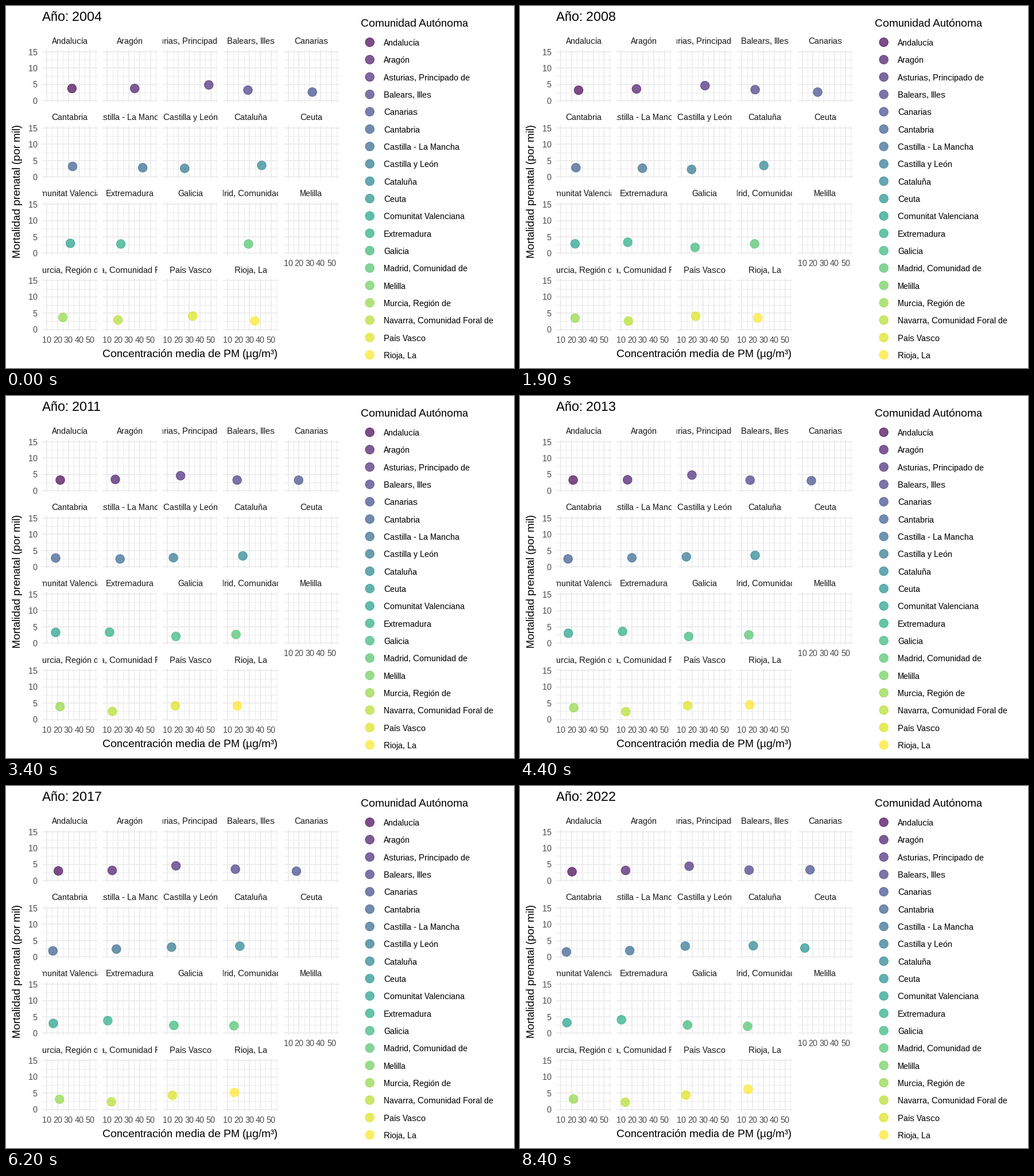
Recreate the animation shown at these times as a matplotlib script. Size 885 by 632 pixels, loop 8500 ms.

```python
import numpy as np
import matplotlib.pyplot as plt
from matplotlib.animation import FuncAnimation
from matplotlib.patches import Circle, Rectangle

W, H, DPI = 885, 632, 64
FRAMES, STEP_MS = 85, 100
FIRST, LAST = 2004, 2022

# panel geometry in pixels
LEFT, TOP, BOTTOM, WIDTH = 63, 76, 167.6, 96
PITCH_X, PITCH_Y = 105.15, 133.2
ZERO_Y, UNIT_Y = 165, 5.68
TEN_X, UNIT_X = 8, 1.885

# first and last PM level, first and last mortality
REGIONS = {
    "Andalucía": (33.3, 20.1, 3.7, 2.7),
    "Aragón": (35.5, 13.7, 3.7, 3.1),
    "Asturias, Principado de": (48.2, 16.4, 4.8, 4.4),
    "Balears, Illes": (28.6, 16.4, 3.2, 3.2),
    "Canarias": (32.3, 16.9, 2.6, 3.3),
    "Cantabria": (33.9, 14.8, 3.2, 1.5),
    "Castilla - La Mancha": (42.9, 17.4, 2.8, 1.9),
    "Castilla y León": (25.9, 13.2, 2.6, 3.3),
    "Cataluña": (41.3, 20.1, 3.5, 3.4),
    "Ceuta": (14.8, 12.4, 8.3, 2.7),
    "Comunitat Valenciana": (31.8, 15.3, 3.0, 3.2),
    "Extremadura": (22.7, 10.0, 2.8, 4.1),
    "Galicia": (27.0, 15.3, 1.8, 2.5),
    "Madrid, Comunidad de": (29.1, 15.0, 2.8, 2.1),
    "Melilla": None,
    "Murcia, Región de": (24.9, 21.7, 3.7, 3.2),
    "Navarra, Comunidad Foral de": (20.1, 13.7, 2.9, 2.2),
    "País Vasco": (33.3, 13.7, 4.1, 4.4),
    "Rioja, La": (34.9, 15.3, 2.6, 6.2),
}
LATE_START = {"Galicia": 2005, "Ceuta": 2019}
COLORS = plt.get_cmap("viridis")(np.linspace(0, 1, len(REGIONS)))

# small yearly ups and downs in mortality
YEARS = np.arange(FIRST, LAST + 1)
WOBBLE = np.random.default_rng(4).normal(0, 0.2, (len(REGIONS), len(YEARS)))
WOBBLE[:, [0, -1]] = 0

plt.rcParams.update({
    "font.family": "Liberation Sans",
    "text.hinting": "native",
    "text.hinting_factor": 1,
})
fig = plt.figure(figsize=(W / DPI, H / DPI), dpi=DPI, facecolor="white")
ax = fig.add_axes([0, 0, 1, 1])
ax.set_xlim(0, W)
ax.set_ylim(H, 0)
ax.axis("off")


def pt(px):
    return px * 72 / DPI


def label(x, y, s, size=15, color="black", ha="left", **kw):
    return ax.text(x, y, s, fontsize=pt(size), color=color, ha=ha,
                   va="baseline", **kw)


def line(xs, ys, width):
    ax.plot(xs, ys, color="#EBEBEB", lw=pt(width), solid_capstyle="butt",
            zorder=1)


def dot(x, y, color):
    shade = (*color[:3], 0.7)
    return ax.add_patch(Circle((x, y), 7.75, facecolor=shade, edgecolor=shade,
                               lw=pt(0.95), zorder=3))


def clip_rect(x, bottom, height):
    return Rectangle((x, bottom), WIDTH, -height, transform=ax.transData)


def corner(k):
    row, col = divmod(k, 5)
    return LEFT + PITCH_X * col, PITCH_Y * row


def to_px(k, pm, deaths):
    x0, dy = corner(k)
    return x0 + TEN_X + (pm - 10) * UNIT_X, ZERO_Y + dy - deaths * UNIT_Y


def draw_panel(k, name):
    x0, dy = corner(k)
    for width, xs, ys in ((1, range(15, 60, 10), (2.5, 7.5, 12.5)),
                          (1.8, range(10, 60, 10), (0, 5, 10, 15))):
        for v in ys:
            y = to_px(k, 0, v)[1]
            line([x0, x0 + WIDTH], [y, y], width)
        for v in xs:
            x = to_px(k, v, 0)[0]
            line([x, x], [TOP + dy, BOTTOM + dy], width)
    strip = label(x0 + WIDTH / 2, 66 + dy, name, color="#1A1A1A", ha="center")
    strip.set_clip_on(True)
    strip.set_clip_path(clip_rect(x0, TOP + dy, 28))
    if k % 5 == 0:
        for v in (0, 5, 10, 15):
            label(54.8, to_px(k, 0, v)[1] + 5.7, v, color="#4D4D4D",
                  ha="right")
    if k + 5 >= len(REGIONS):
        for v in range(10, 60, 10):
            label(to_px(k, v, 0)[0], 188 + dy, v, color="#4D4D4D",
                  ha="center")


def state(k, name, year):
    """PM falls along an S-shaped curve, mortality drifts evenly."""
    pm0, pm1, d0, d1 = REGIONS[name]
    start = LATE_START.get(name, FIRST)
    t = max(0, (year - start) / (LAST - start))
    pm = pm1 + (pm0 - pm1) / (1 + (t / 0.22) ** 2.5)
    deaths = d0 + (d1 - d0) * t + np.interp(year, YEARS, WOBBLE[k])
    return pm, deaths, year >= start


dots = []
for k, name in enumerate(REGIONS):
    draw_panel(k, name)
    y = 63.3 + 30.32 * k
    dot(633.7, y, COLORS[k])
    label(658, y + 5.8, name)
    if REGIONS[name]:
        d = dot(0, 0, COLORS[k])
        x0, dy = corner(k)
        d.set_clip_path(clip_rect(x0, BOTTOM + dy, BOTTOM - TOP))
        dots.append((k, name, d))

title = label(63, 26.4, "", size=23)
label(618, 36, "Comunidad Autónoma", size=19)
label(320.7, 613, "Concentración media de PM (µg/m³)", size=19, ha="center")
label(24.8, 323, "Mortalidad prenatal (por mil)", size=19, ha="center",
      rotation=90, rotation_mode="anchor")


def draw(i):
    year = FIRST + i * (LAST - FIRST) / (FRAMES - 1)
    title.set_text(f"Año: {round(year)}")
    for k, name, d in dots:
        pm, deaths, shown = state(k, name, year)
        d.center = to_px(k, pm, deaths)
        d.set_visible(shown)
    return [title] + [d for _, _, d in dots]


anim = FuncAnimation(fig, draw, frames=FRAMES, interval=STEP_MS,
                     init_func=lambda: draw(0), repeat=True, repeat_delay=0)
plt.show()
```
